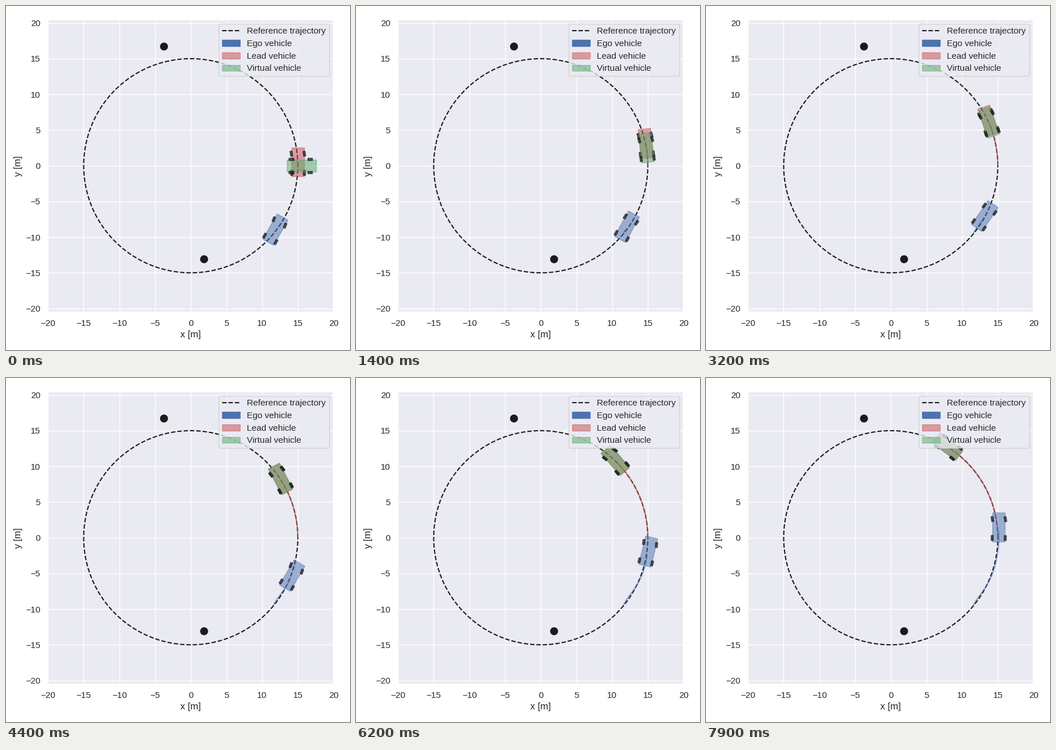
Animation, 600 px wide and 600 px high, one loop 8 s. Source, as a matplotlib script:

```python
import numpy as np
import matplotlib.pyplot as plt
from matplotlib.animation import FuncAnimation
from matplotlib.patches import Circle, Patch, Polygon

BLUE, RED, GREEN = "#4c72b0", "#c44e52", "#55a868"
DARK, TEXT, PANEL = "0.1", "0.15", "#eaeaf2"
SIZE, SCALE, RADIUS = 600, 12.45, 15
FRAMES, STEP, SUBSTEPS = 80, 100, 20
FRONT, REAR, TRACK = 1.69, 0.95, 0.91  # axle offsets and half track
WHEELBASE = FRONT + REAR

plt.rcParams.update({
    "font.family": "Liberation Sans",
    "text.color": TEXT, "axes.labelcolor": TEXT,
    "xtick.color": TEXT, "ytick.color": TEXT,
    "axes.facecolor": PANEL, "axes.edgecolor": "white",
    "axes.linewidth": 1.25, "axes.axisbelow": True, "axes.labelsize": 12,
    "axes.grid": True, "grid.color": "white", "grid.linewidth": 1,
    "xtick.labelsize": 11, "ytick.labelsize": 11, "legend.fontsize": 11,
    "xtick.bottom": False, "ytick.left": False,
    "xtick.major.size": 6, "ytick.major.size": 6,
    "lines.solid_capstyle": "round",
})


def on_circle(deg):
    a = np.radians(deg)
    return RADIUS * np.cos(a), RADIUS * np.sin(a)


def place(points, x, y, deg):
    c, s = np.cos(np.radians(deg)), np.sin(np.radians(deg))
    return np.asarray(points) @ np.array([[c, s], [-s, c]]) + (x, y)


def box(x0, x1, half):
    return np.array([(x0, -half), (x1, -half), (x1, half), (x0, half)])


def bump(t, center, width):
    return np.exp(-((t - center) / width) ** 2)


def settle(t, tau):
    return 1 - np.exp(-t / tau)


def steer_angle(curvature):
    return np.degrees(np.arctan(WHEELBASE * curvature))


def drive(x, y, heading, speed, curvature, dt):
    """Integrate a kinematic bicycle model from a start pose."""
    def total(rate):
        return np.concatenate(([0], np.cumsum(rate[:-1]) * dt))
    theta = np.radians(heading) + total(speed * curvature)
    course = theta + np.arctan(REAR * curvature)
    return (x + total(speed * np.cos(course)),
            y + total(speed * np.sin(course)), np.degrees(theta))


class Vehicle:
    BODY = box(-1.5, 2.57, 0.875)
    WHEEL = box(-0.35, 0.35, 0.15)

    def __init__(self, ax, color):
        def shape(c, alpha):
            return ax.add_patch(Polygon(self.BODY, color=c, alpha=alpha, lw=1, zorder=3))
        self.body = shape(color, 0.5)
        self.wheels = [shape(DARK, 0.7) for _ in range(4)]

    def move(self, x, y, heading, steer):
        self.body.set_xy(place(self.BODY, x, y, heading))
        spots = [(axle, side * TRACK, turn)
                 for axle, turn in ((FRONT, steer), (-REAR, 0))
                 for side in (-1, 1)]
        for wheel, (wx, wy, turn) in zip(self.wheels, spots):
            wheel.set_xy(place(place(self.WHEEL, wx, wy, turn), x, y, heading))


# Motion over time, in seconds, metres and degrees
t = np.arange(FRAMES) * STEP / 1000
circle_steer = steer_angle(1 / RADIUS)

# Ego: speeds up, swings wide, then corrects back onto the circle
dt = STEP / 1000 / SUBSTEPS
fine = np.arange(FRAMES * SUBSTEPS) * dt
speed = 2 / (1 + np.exp(-(fine - 2.23) / 0.9))
curvature = 1 / RADIUS - 0.14 * bump(fine, 2.2, 1.3) + 0.038 * bump(fine, 4.9, 0.6)
path = drive(11.6, -9.42, 60.5, speed, curvature, dt)
ego_x, ego_y, ego_heading, ego_steer = (
    v[::SUBSTEPS] for v in (*path, steer_angle(curvature)))

# Lead: steady lap
lead_angle = 7.08 * t
lead_x, lead_y = on_circle(lead_angle)
lead_heading = 90 + lead_angle - 4.2 * settle(t, 0.5)

# Virtual: follows the lead with a decaying lag, unaligned until its first update
virt_angle = lead_angle - 5.7 * np.exp(-t / 2) * np.sin(np.pi * t / 4.4)
virt_x, virt_y = on_circle(virt_angle)
virt_heading = np.where(t > 0, 90 + virt_angle - 2.8 * settle(t, 1.5), 0)
virt_steer = np.where(t > 0, circle_steer, 0)

# Stage
fig = plt.figure(figsize=(6, 6), dpi=100, facecolor="white")
left, bottom, width, height = 73.25, 66.4, 40 * SCALE, 510
ax = fig.add_axes([v / SIZE for v in (left, bottom, width, height)])
ax.set_xlim(-20, 20)
ax.set_ylim(-height / 2 / SCALE, height / 2 / SCALE)
ax.set_xticks(range(-20, 21, 5))
ax.set_yticks(range(-20, 21, 5))
ax.set_xlabel("x [m]")
ax.set_ylabel("y [m]")

reference, = ax.plot(*on_circle(np.linspace(0, 360, 400)), "--", color=DARK, lw=1.5)
for center in ((-3.75, 16.7), (1.87, -13.1)):
    ax.add_patch(Circle(center, 0.5, color=DARK, lw=1, zorder=2))

ego_trail, = ax.plot([], [], color=BLUE, lw=1.5, alpha=0.6)
lead_trail, = ax.plot([], [], color=RED, lw=1.5, alpha=0.7)
ego, lead, virtual = (Vehicle(ax, c) for c in (BLUE, RED, GREEN))

ax.legend(
    [reference, Patch(color=BLUE, lw=1), Patch(color=RED, alpha=0.5, lw=1),
     Patch(color=GREEN, alpha=0.5, lw=1)],
    ["Reference trajectory", "Ego vehicle", "Lead vehicle", "Virtual vehicle"],
    loc="upper right", framealpha=0.8, edgecolor="0.8")


def draw(i):
    ego.move(ego_x[i], ego_y[i], ego_heading[i], ego_steer[i])
    lead.move(lead_x[i], lead_y[i], lead_heading[i], circle_steer)
    virtual.move(virt_x[i], virt_y[i], virt_heading[i], virt_steer[i])
    ego_trail.set_data(ego_x[:i + 1], ego_y[:i + 1])
    lead_trail.set_data(lead_x[:i + 1], lead_y[:i + 1])
    return []


anim = FuncAnimation(fig, draw, frames=FRAMES, interval=STEP, repeat=True,
                     repeat_delay=0, init_func=lambda: draw(0))
plt.show()
```
